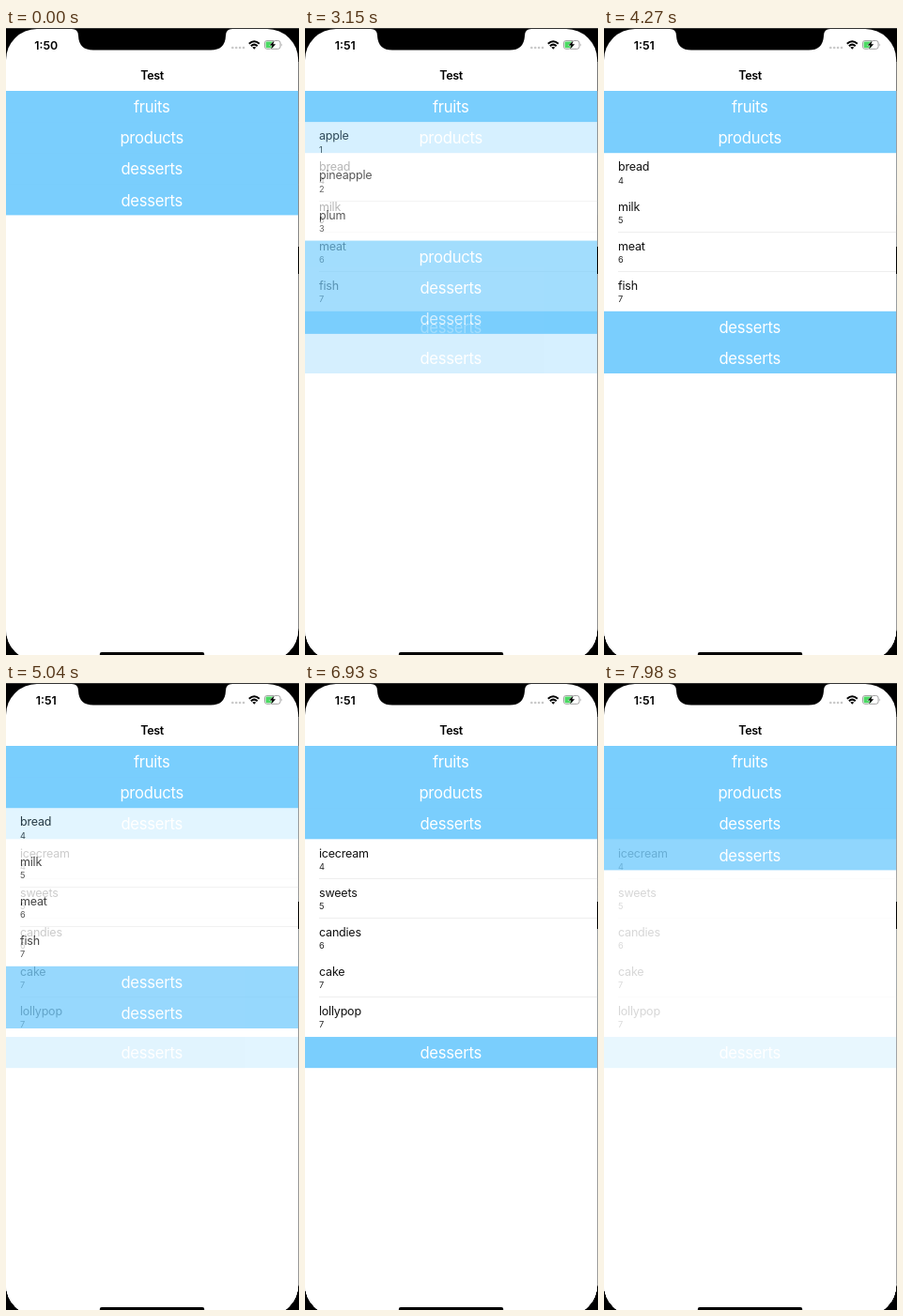
An HTML page that plays this animation: 312 px wide and 668 px high, repeating every 8000 ms.

```html
<!DOCTYPE html>
<html lang="en">
<head>
<meta charset="utf-8">
<title>Expandable list</title>
<style>
  html, body { margin: 0; width: 100%; height: 100%; overflow: hidden; background: #000; }
  svg { display: block; width: 100vw; height: 100vh; }
  text { font-family: Inter, Roboto, sans-serif; }
  .head { font-size: 16.6px; letter-spacing: -.27px; fill: #fff; text-anchor: middle; }
  .name { font-size: 12.5px; letter-spacing: -.2px; fill: #111; }
  .note { font-size: 9.2px; fill: #222; }
  .title { font-size: 12.5px; letter-spacing: -.35px; font-weight: 600; text-anchor: middle; }
  .clock { font-size: 12.4px; font-weight: 600; text-anchor: middle; }
</style>
</head>
<body>
<svg viewBox="0 0 312 668" preserveAspectRatio="none">
  <defs>
    <clipPath id="screen"><rect y="1" width="311.2" height="673" rx="33"/></clipPath>
  </defs>
  <rect width="312" height="668"/>
  <g clip-path="url(#screen)">
    <rect width="312" height="668" fill="#fff"/>
    <g id="lists"></g>
    <text class="title" x="155.5" y="55.3">Test</text>
    <text class="clock" id="clock" x="42.8" y="22.6"></text>
    <g fill="#c8c8c8">
      <circle cx="241.3" cy="21" r="1.3"/><circle cx="245.2" cy="21" r="1.3"/>
      <circle cx="249.1" cy="21" r="1.3"/><circle cx="253" cy="21" r="1.3"/>
    </g>
    <g fill="none" stroke="#000" stroke-width="2">
      <path d="M258.8 16.8Q264.3 11.6 269.8 16.8M260.9 19.2Q264.3 16 267.7 19.2"/>
      <path d="M262.3 20.6Q264.3 19.2 266.3 20.6L264.3 22.8Z" fill="#000" stroke="none"/>
    </g>
    <rect x="275.5" y="13.5" width="16.6" height="8.8" rx="2.4" fill="#fff" stroke="#999" stroke-width=".9"/>
    <path d="M293.5 16.4Q295 17.9 293.5 19.4Z" fill="#999"/>
    <rect x="276.6" y="14.6" width="8.2" height="6.6" rx="1.2" fill="#4cd964"/>
    <path d="M285.8 13.2L280.6 18.6H283.4L282 22.8L287.2 17.2H284.4Z" stroke="#fff" stroke-width=".8" paint-order="stroke"/>
    <path d="M70 0V1Q76.8 1 77 8Q77.6 23.6 93 23.6H218Q233.400 23.6 234 8Q234.200 1 241 1V0Z"/>
    <rect x="99.800" y="665" width="111.400" height="4.200" rx="2.100"/>
  </g>
  <path d="M311.6 36V640" stroke="#999" stroke-width=".8"/>
  <path d="M311.5 233V262" stroke="#000"/>
  <path d="M0 .5H312" stroke="#333"/>
</svg>
<script>
const LOOP = 8000, STEP = 70, CLOCK_TICK = 1400;
const TOP = 67, HEAD_H = 33.1, ROW_H = 42.15, BLUE = '#7acefd';

const sections = [
  { name: 'fruits', rows: ['apple 1', 'pineapple 2', 'plum 3'], rules: [2] },
  { name: 'products', rows: ['bread 4', 'milk 5', 'meat 6', 'fish 7'], rules: [2, 3] },
  { name: 'desserts', rows: ['icecream 4', 'sweets 5', 'candies 6', 'cake 7', 'lollypop 7'], rules: [1, 2, 4] },
  { name: 'desserts', rows: [], rules: [] }
];

// Each state fades in over the previous one; open -1 means all collapsed.
const states = [
  { open: -1, start: -1000, dur: 1 },
  { open: 0, start: 1335, dur: 200 },
  { open: 1, start: 3040, dur: 300 },
  { open: 2, start: 4950, dur: 300 },
  { open: -1, start: 7758, dur: 300 }
];

const label = (cls, x, y, s) => `<text class="${cls}" x="${x}" y="${y}">${s}</text>`;

function row(text, y) {
  const [name, note] = text.split(' ');
  return label('name', 15, y + 19.2, name) + label('note', 15, y + 32.4, note);
}

function list(open) {
  let y = TOP, out = '<rect y="67" width="312" height="601" fill="#fff"/>';
  sections.forEach((sec, i) => {
    // Overlap by a pixel where the next header touches this one.
    const h = HEAD_H + (i !== open && i < sections.length - 1 ? 1 : 0);
    out += `<rect y="${y}" width="312" height="${h}" fill="${BLUE}"/>`;
    out += label('head', 155.2, y + 23.2, sec.name);
    y += HEAD_H;
    if (i !== open) return;
    const top = y;
    sec.rows.forEach(r => { out += row(r, y); y += ROW_H; });
    sec.rules.forEach(n => {
      out += `<rect x="15" y="${Math.floor(top + n * ROW_H)}" width="297" height="1" fill="#eee"/>`;
    });
  });
  return `<g>${out}</g>`;
}

const lists = document.getElementById('lists');
const clock = document.getElementById('clock');
lists.innerHTML = states.map(s => list(s.open)).join('');
const layers = [...lists.children];

function ease(x) {
  x = Math.min(1, Math.max(0, x));
  return x * x * (3 - 2 * x);
}

function render(time) {
  const t = Math.floor(time % LOOP / STEP) * STEP;
  states.forEach((s, i) => layers[i].setAttribute('opacity', ease((t - s.start) / s.dur)));
  clock.textContent = t < CLOCK_TICK ? '1:50' : '1:51';
}

const begin = performance.now();
function tick() {
  render(performance.now() - begin);
  requestAnimationFrame(tick);
}
tick();
</script>
</body>
</html>
```
